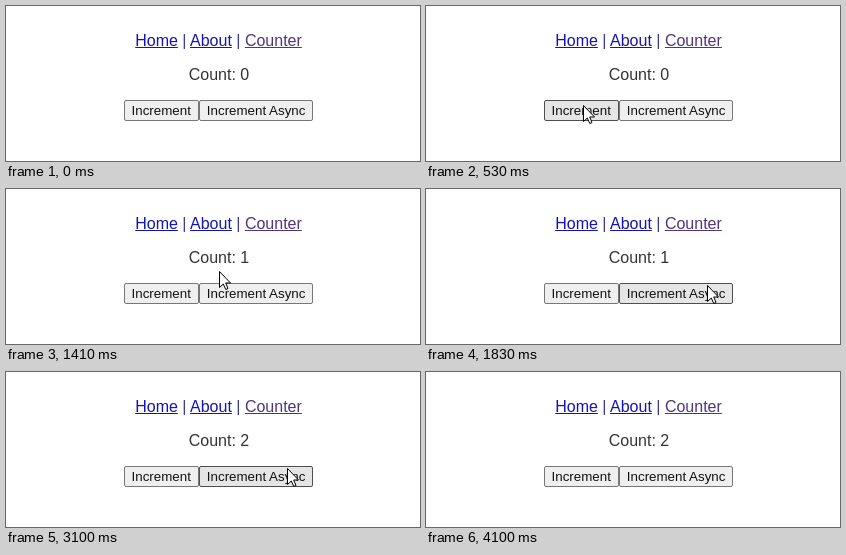
Animation of 414x155 px, one loop 4.34 s. Source, as an HTML page:

```html
<!DOCTYPE html>
<html lang="en">
<head>
<meta charset="utf-8">
<title>Counter</title>
<style>
  html, body { margin: 0; width: 100%; height: 100%; overflow: hidden; background: #fff; }
  #stage { position: relative; width: 100%; height: 100%; overflow: clip;
    font: 16px/18px "Liberation Sans", Arial, sans-serif; color: #333; text-align: center; }
  .row { position: absolute; left: 11px; right: 0; white-space: nowrap; }
  .nav { top: 26px; color: #3a3a9c; }
  .link { color: #1414b4; text-decoration: underline; }
  .current { color: #50347c; }
  .count { top: 60px; left: 12px; }
  .buttons { top: 94px; display: flex; justify-content: center; }
  .button { box-sizing: border-box; height: 21px; padding: 2px 7px; font-size: 13.333px; line-height: 15px;
    color: #111; background: #efefef; border: 1px solid #767676; border-radius: 2px; }
  .hover { background: #e5e5e5; border-color: #4f4f4f; }
  .pressed { background: #f5f5f5; border-color: #8d8d8d; }
  #cursor { position: absolute; left: 0; top: 0; }
</style>
</head>
<body>
<div id="stage">
  <div class="row nav"><span class="link">Home</span> | <span class="link">About</span> | <span class="link current">Counter</span></div>
  <div class="row count">Count: <span id="count">0</span></div>
  <div class="row buttons"><div class="button">Increment</div><div class="button">Increment Async</div></div>
  <svg id="cursor" width="13" height="20">
    <path d="M.5 .5V16.5L4.3 13L6.8 18.5L9 17.5L6.7 12H11.5Z" fill="#fff" stroke="#000"/>
  </svg>
</div>
<script>
const LOOP = 4340;
const count = document.getElementById('count');
const cursor = document.getElementById('cursor');
const [increment, incrementAsync] = document.querySelectorAll('.button');

const linear = p => p;
const easeOut = p => 1 - (1 - p) ** 2;
const moves = [
  { start: 130, end: 530, steps: 5, from: [262, 81], to: [157, 99], ease: easeOut },
  { start: 1410, end: 1830, steps: 6, from: [213, 82], to: [281, 96], ease: easeOut },
  { start: 3750, end: 4100, steps: 4, from: [303, 108], to: [384, 157], ease: linear },
];

// The pointer jumps in equal time steps, then rests until the next move.
function pointerAt(t) {
  const { start, end, steps, from, to, ease } = moves.findLast(move => move.start <= t) || moves[0];
  const progress = Math.min(1, Math.floor((t - start) / (end - start) * steps) / steps);
  return from.map((value, i) => Math.round(value + (to[i] - value) * ease(progress)));
}

function drawButton(button, left, right, [x, y], pressed) {
  button.classList.toggle('hover', x >= left && x < right && y >= 94 && y < 115);
  button.classList.toggle('pressed', pressed);
}

function draw(t) {
  const visible = t >= 130 && t < 4100;
  const pointer = visible ? pointerAt(t) : [0, 0];
  cursor.style.display = visible ? 'block' : 'none';
  cursor.style.transform = `translate(${pointer[0]}px, ${pointer[1]}px)`;
  count.textContent = t < 800 ? 0 : t < 3100 ? 1 : 2;
  drawButton(increment, 118, 193, pointer, t >= 730 && t < 800);
  drawButton(incrementAsync, 193, 307, pointer, t >= 2030 && t < 2100);
}

const begin = performance.now();
function frame() {
  draw((performance.now() - begin) % LOOP);
  requestAnimationFrame(frame);
}
frame();
</script>
</body>
</html>
```
